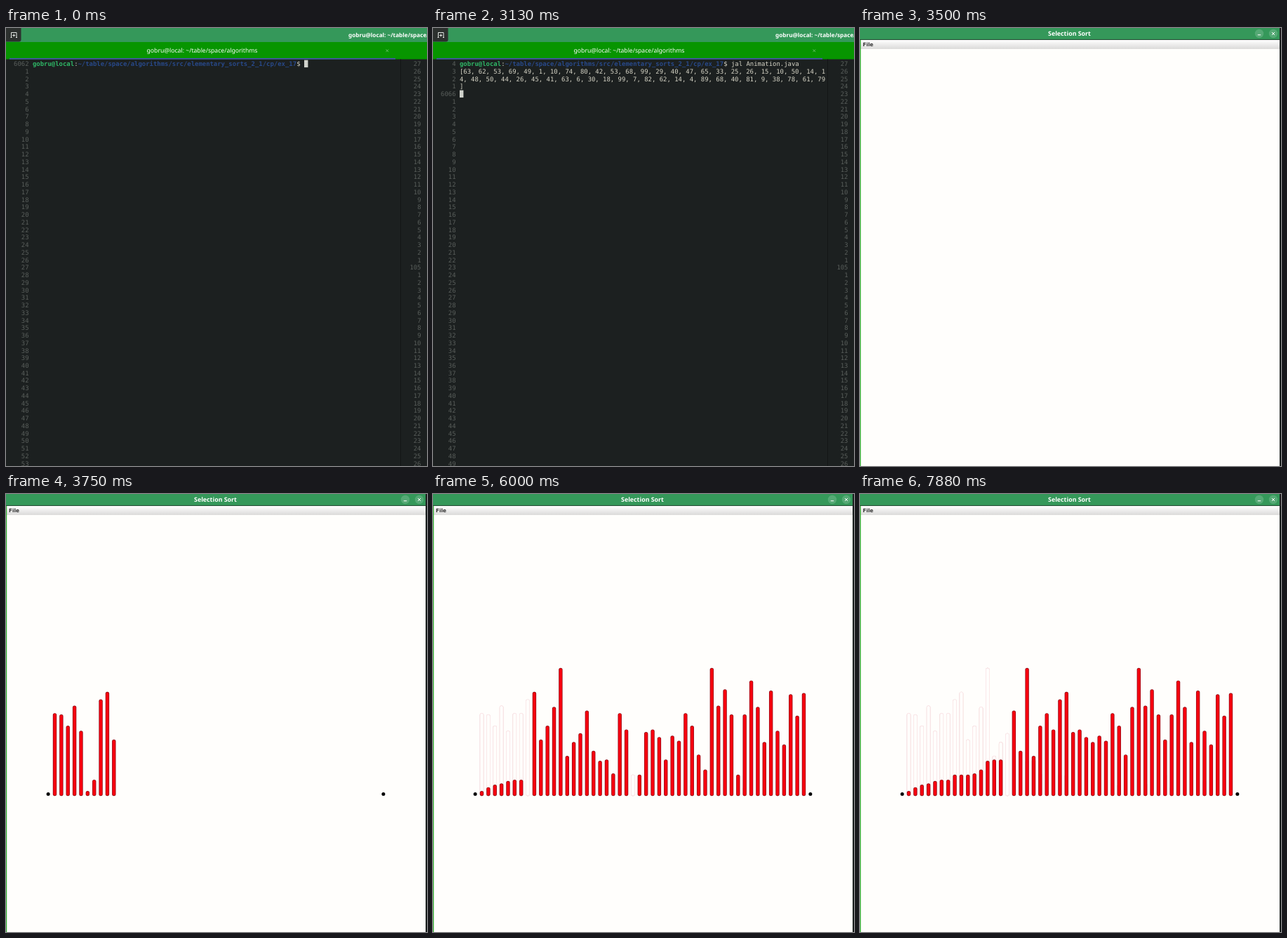
Write an HTML page with a canvas that moves like this. It is 600 px wide and 624 px high and loops after 8000 ms.

```html
<!DOCTYPE html>
<html lang="en">
<head>
<meta charset="utf-8">
<title>Selection Sort</title>
<style>
  html, body { margin: 0; width: 100%; height: 100%; overflow: hidden; background: #1c2020; }
  svg, canvas { position: absolute; left: 0; top: 0; width: 600px; height: 624px; }
  text { white-space: pre; text-rendering: geometricPrecision; }
  .ui { font-family: "Noto Sans", "Open Sans", sans-serif; fill: #fff; }
  .mono { font: 8.93px "DejaVu Sans Mono", monospace; fill: #d6d4c6; }
  .gutter { fill: #595e5b; text-anchor: end; }
  .bold { font-weight: bold; }
  .user { fill: #2fb866; }
  .path { fill: #28498a; }
  .hidden { visibility: hidden; }
</style>
</head>
<body>
<svg id="terminal" viewBox="0 0 600 624">
  <rect width="600" height="624" fill="#1c2020"/>
  <rect width="600" height="20" fill="#35985a"/>
  <rect y="20" width="600" height="24.5" fill="#079500"/>
  <rect x="-3" y="-3" width="24.5" height="22.5" rx="3" fill="#2c302e"/>
  <path d="M7.5 13.5V6.5h7.5v7M6.5 13.5h2M14 13.5h2M11.2 8.5v4M9.2 10.5h4" fill="none" stroke="#e4e8e5"/>
  <text class="ui bold" x="488" y="13" font-size="8.2">gobru@local: ~/table/space/algorithms</text>
  <text class="ui" x="279.5" y="35.2" font-size="8.63" text-anchor="middle">gobru@local: ~/table/space/algorithms</text>
  <path d="M541.5 30.5l3.6 3.6m0-3.6l-3.6 3.6" stroke="#7fcb7a" stroke-width=".8"/>
  <rect x="5" y="43" width="550" height="1.6" fill="#4a50b4"/>
  <rect x="562" y="44.5" width="1" height="580" fill="#131615"/>
  <g id="rows" class="mono"></g>
  <rect id="cursor" width="5.4" height="10.4" fill="#d0d3cc"/>
</svg>

<div id="app" class="hidden">
  <svg viewBox="0 0 600 624">
    <defs>
      <linearGradient id="menu" x2="0" y2="1">
        <stop stop-color="#fff"/><stop offset="1" stop-color="#dbdad9"/>
      </linearGradient>
    </defs>
    <rect width="600" height="624" fill="#ecebea"/>
    <rect width="600" height="16.5" fill="#35985a"/>
    <rect y="16" width="600" height="1.2" fill="#1f4a30"/>
    <text class="ui bold" x="298.5" y="11.2" font-size="8.86" text-anchor="middle">Selection Sort</text>
    <g fill="#55a975"><circle cx="569" cy="8" r="6.2"/><circle cx="589" cy="8" r="6.2"/></g>
    <path d="M566.8 9.8h4.4M587 6l4 4m0-4l-4 4" stroke="#fff"/>
    <rect id="menuBar" x="1" y="17.2" height="12.6" fill="url(#menu)"/>
    <text x="4" y="25.7" font-size="7.3" font-weight="bold" font-family="DejaVu Sans, sans-serif" fill="#333">File</text>
    <rect id="page" x="1" y="30" fill="#fffefc"/>
    <rect y="17" width="1.2" height="607" fill="#35b035"/>
    <rect x="598" width="2" height="624" fill="#1c2020"/>
  </svg>
  <canvas id="plot" width="600" height="624"></canvas>
</div>

<script>
const LOOP = 8000, TICK = 125;
const COL = 5.375, ROW = 10.745, LEFT = 38, ROWS = 54, LINE_CHARS = 97;
const COMMAND = 'jal Animation.java';
const PROMPT_CHARS = 72;
const values = [63, 62, 53, 69, 49, 1, 10, 74, 80, 42, 53, 68, 99, 29, 40, 47, 65, 33, 25, 26,
  15, 10, 50, 14, 14, 48, 50, 44, 26, 45, 41, 63, 6, 30, 18, 99, 7, 82, 62, 14,
  4, 89, 68, 40, 81, 9, 38, 78, 61, 79];

const $ = id => document.getElementById(id);
const show = (el, on) => el.classList.toggle('hidden', !on);

// Terminal
function addText(x, row, content, className = '') {
  const el = document.createElementNS('http://www.w3.org/2000/svg', 'text');
  el.setAttribute('x', x);
  el.setAttribute('y', 54.2 + row * ROW);
  el.setAttribute('class', className);
  el.textContent = content;
  $('rows').append(el);
  return el;
}

const gutter = [];
for (let row = 0; row < ROWS; row++) {
  gutter.push(addText(32.6, row, '', 'gutter'));
  addText(591.5, row, row === 27 ? 105 : Math.abs(row - 27), 'gutter');
}
addText(LEFT, 0, 'gobru@local', 'bold user');
addText(LEFT + 11 * COL, 0, ':');
addText(LEFT + 12 * COL, 0, '~/table/space/algorithms/src/elementary_sorts_2_1/cp/ex_17', 'bold path');
addText(LEFT + 70 * COL, 0, '$');
const command = addText(LEFT + PROMPT_CHARS * COL, 0, COMMAND);
const printed = `[${values.join(', ')}]`;
const output = [0, 1, 2].map(i =>
  addText(LEFT, i + 1, printed.slice(i * LINE_CHARS, (i + 1) * LINE_CHARS)));

function drawTerminal(tick) {
  const typed = tick >= 4, entered = tick >= 8, done = tick >= 21;
  const row = done ? 4 : entered ? 1 : 0;
  const col = entered ? 0 : PROMPT_CHARS + (typed ? COMMAND.length : 0);
  show(command, typed);
  output.forEach(line => show(line, done));
  gutter.forEach((label, r) => label.textContent = r === row ? 6062 + row : Math.abs(r - row));
  $('cursor').setAttribute('x', LEFT + col * COL);
  $('cursor').setAttribute('y', 45.7 + row * ROW);
}

// Sort window: every paint operation of the selection sort, in order
const BASE = 427.5, UNIT = 1.788;
const slotX = slot => 69.5 + slot * 9.367;
const ctx = $('plot').getContext('2d');
ctx.lineCap = 'round';

function strokeBar(slot, value, color, width) {
  ctx.strokeStyle = color;
  ctx.lineWidth = width;
  ctx.beginPath();
  ctx.moveTo(slotX(slot), BASE);
  ctx.lineTo(slotX(slot), BASE - value * UNIT);
  ctx.stroke();
}
function paint(slot, value) {
  strokeBar(slot, value, '#8c0a14', 5.4);
  strokeBar(slot, value, '#f6000f', 4);
}
function erase(slot, value) {
  strokeBar(slot, value, '#fffefc', 6.2);
  strokeBar(slot, value, '#f9dfe2', 5.6);
  strokeBar(slot, value, '#fffefc', 4.2);
}

function sortOperations(list) {
  const a = [...list];
  const ops = a.map((v, i) => [paint, i, v]);
  for (let i = 0; i < a.length; i++) {
    let min = i;
    for (let j = i + 1; j < a.length; j++) if (a[j] < a[min]) min = j;
    ops.push([erase, i, a[i]], [erase, min, a[min]]);
    [a[i], a[min]] = [a[min], a[i]];
    ops.push([paint, i, a[i]], [paint, min, a[min]]);
  }
  return ops;
}
const operations = sortOperations(values);

// [tick, operations finished], with short stalls
const pace = [[30, 10], [31, 27], [32, 27], [33, 50], [34, 51], [37, 58], [38, 58], [39, 60],
  [45, 72.9], [48, 80], [50, 84], [51, 84.9], [58, 100], [63, 111]];

function finishedCount(tick) {
  if (tick < pace[0][0]) return 0;
  const next = pace.findIndex(([t]) => t > tick);
  if (next < 0) return pace.at(-1)[1];
  const [t0, n0] = pace[next - 1], [t1, n1] = pace[next];
  return Math.floor(n0 + (n1 - n0) * (tick - t0) / (t1 - t0));
}

function drawWindow(tick) {
  const opening = tick < 28;
  $('menuBar').setAttribute('width', opening ? 305 : 597);
  $('page').setAttribute('width', opening ? 153 : 597);
  $('page').setAttribute('height', opening ? 153 : 594);
  ctx.clearRect(0, 0, 600, 624);
  if (tick < 30) return;
  ctx.fillStyle = '#000';
  for (const slot of [-1, values.length]) {
    ctx.beginPath();
    ctx.arc(slotX(slot), BASE, 2.5, 0, 2 * Math.PI);
    ctx.fill();
  }
  for (const [draw, slot, value] of operations.slice(0, finishedCount(tick))) draw(slot, value);
}

const start = performance.now();
let lastTick = -1;
function render() {
  const tick = Math.floor((performance.now() - start) % LOOP / TICK);
  if (tick !== lastTick) {
    lastTick = tick;
    const open = tick >= 27;
    show($('app'), open);
    if (open) drawWindow(tick);
    else drawTerminal(tick);
  }
  requestAnimationFrame(render);
}
render();
</script>
</body>
</html>
```
